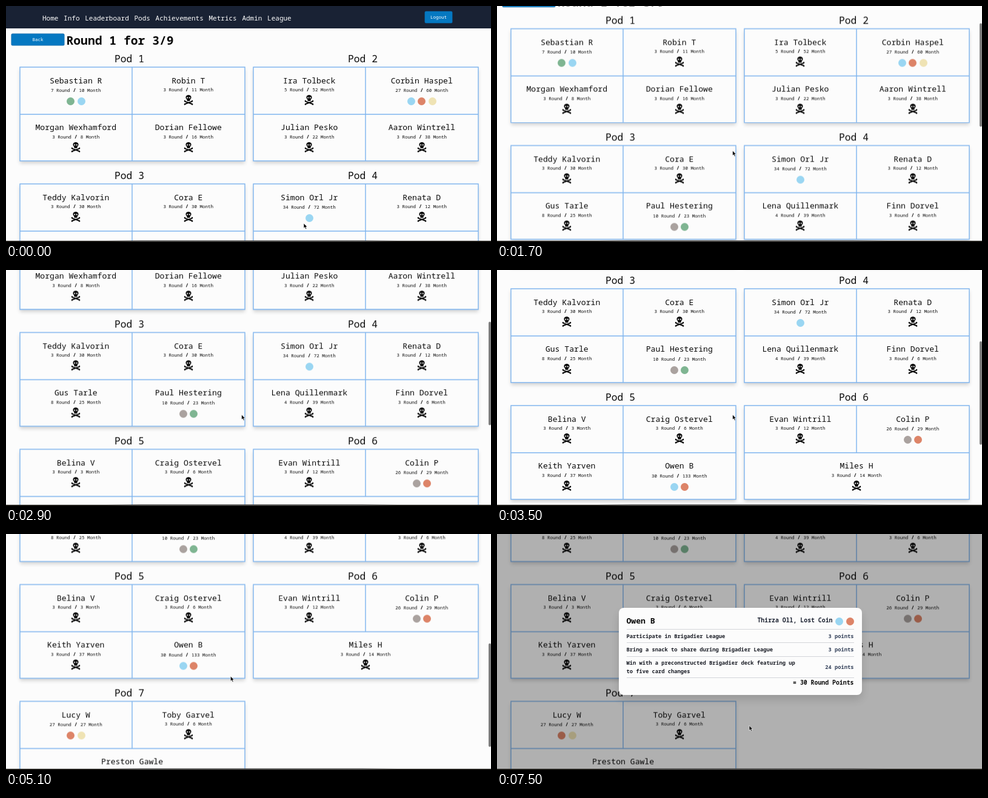
These frames come from a looping animation (800 by 390 pixels, 8000 ms). An HTML page:

```html
<!DOCTYPE html>
<html lang="en">
<head>
<meta charset="utf-8">
<title>League pods</title>
<style>
html, body { margin: 0; width: 100%; height: 100%; overflow: hidden; background: #fcfcfc; }
body { font-family: "Roboto Mono", "Noto Sans Mono", "DejaVu Sans Mono", monospace; color: #0a0a0a; }
#stage { position: relative; width: 800px; height: 390px; overflow: hidden; }
#stage div, #stage svg { position: absolute; }
#page { left: 0; top: 0; width: 800px; height: 880px; will-change: transform; }
.nav { left: 0; top: 0; width: 800px; height: 37px; background: #192234; }
.btn { background: #0578c1; border-radius: 2px; box-shadow: 0 0 0 .5px #0a5f9c; }
.text { white-space: pre; line-height: 1; }
.box { width: 371px; height: 155px; box-shadow: 0 0 0 .7px #7db4ee, 0 4px 6px rgba(0, 0, 0, .17); }
.cell { height: 77.5px; box-shadow: inset 0 0 0 .7px #7db4ee; }
.slash { font-size: 8.3px; font-weight: 700; }
.mana { width: 13px; height: 13px; border-radius: 50%; }
#dim { inset: 0; background: #000; }
#modal { left: 200.5px; top: 122px; width: 400.5px; height: 144px; border-radius: 8px;
  background: #fcfcfc; box-shadow: 0 8px 16px rgba(0, 0, 0, .14); }
.rule { left: 12.5px; width: 375px; height: 1px; background: #d3d5d9; }
#bar { left: 796px; top: 0; width: 3.5px; height: 171px; border-radius: 2px; background: #7d7d7d; }
#dock { left: 0; top: 388px; width: 800px; height: 2px; background: #211f1b; }
#glow { left: 165px; top: 386.5px; width: 480px; height: 3.5px;
  background: linear-gradient(90deg, #5550, #5559 12%, #5559 88%, #5550); }
</style>
</head>
<body>
<div id="stage">
  <div id="page"></div>
  <div id="dim"></div>
  <div id="modal"></div>
  <div id="bar"></div>
  <div id="dock"></div>
  <div id="glow"></div>
  <svg id="arrow" width="10" height="13" viewBox="-1 -1 10 13">
    <path d="M0 0V8.3L1.9 6.6L3.3 9.7L4.8 9L3.5 6.1H6Z" fill="#000" stroke="#fff" stroke-width=".7"/>
  </svg>
  <svg id="beam" width="8" height="12" viewBox="-4 -6 8 12">
    <path d="M-2 -4.5Q0 -4.5 0 -3V3Q0 4.5 -2 4.5M2 -4.5Q0 -4.5 0 -3M0 3Q0 4.5 2 4.5" fill="none" stroke="#111"/>
  </svg>
</div>
<script>
const $ = id => document.getElementById(id);
const page = $("page"), modal = $("modal");

const MANA = { u: "#9ad6f2", g: "#7fb592", r: "#dd8468", w: "#efe3b4", b: "#aaa29f" };

// Each player: name, round points, month points, colours.
const PODS = [
  [["Sebastian R", 7, 10, "gu"], ["Robin T", 3, 11], ["Morgan Wexhamford", 3, 8], ["Dorian Fellowe", 3, 16]],
  [["Ira Tolbeck", 5, 52], ["Corbin Haspel", 27, 60, "urw"], ["Julian Pesko", 3, 22], ["Aaron Wintrell", 3, 38]],
  [["Teddy Kalvorin", 3, 30], ["Cora E", 3, 30], ["Gus Tarle", 8, 25], ["Paul Hestering", 10, 23, "bg"]],
  [["Simon Orl Jr", 34, 72, "u"], ["Renata D", 3, 12], ["Lena Quillenmark", 4, 39], ["Finn Dorvel", 3, 6]],
  [["Belina V", 3, 3], ["Craig Ostervel", 3, 6], ["Keith Yarven", 3, 37], ["Owen B", 30, 133, "ur"]],
  [["Evan Wintrill", 3, 12], ["Colin P", 26, 29, "br"], ["Miles H", 3, 14]],
  [["Lucy W", 27, 27, "rw"], ["Toby Garvel", 3, 6], ["Preston Gawle", 3, 27]]
];

const SKULL = `<g stroke="#0a0a0a" stroke-width="2" stroke-linecap="round">
  <path d="M2 10.6L14 15M14 10.6L2 15"/></g>
  <g fill="#0a0a0a"><circle cx="1.9" cy="9.9" r="1.2"/><circle cx="14.1" cy="9.9" r="1.2"/>
  <circle cx="1.9" cy="15.6" r="1.2"/><circle cx="14.1" cy="15.6" r="1.2"/>
  <ellipse cx="8" cy="4.1" rx="4.6" ry="4.1"/><rect x="5.4" y="5" width="5.2" height="4.9" rx=".9"/></g>
  <g fill="#fcfcfc"><circle cx="6.2" cy="4.6" r="1.15"/><circle cx="9.8" cy="4.6" r="1.15"/></g>`;

function add(parent, cls, style, html = "") {
  const el = document.createElement("div");
  el.className = cls;
  Object.assign(el.style, style);
  el.innerHTML = html;
  parent.append(el);
  return el;
}

// Text centred vertically on y; align is 0 (left), .5 (centre) or 1 (right) of x.
function text(parent, html, x, y, size, { align = 0, weight = 500, color = "" } = {}) {
  return add(parent, "text", {
    left: x + "px", top: y + "px", fontSize: size + "px", fontWeight: weight, color,
    transform: `translate(${-align * 100}%, -50%)`
  }, html);
}

function rect(parent, cls, x, y, w, h) {
  return add(parent, cls, { left: x + "px", top: y + "px", width: w + "px", height: h + "px" });
}

function mana(parent, key, x, y) {
  add(parent, "mana", { left: x - 6.5 + "px", top: y - 6.5 + "px", background: MANA[key] });
}

function player(box, [name, round, month, colors = ""], x, y, width) {
  const cell = rect(box, "cell", x, y, width, 77.5);
  const mid = width / 2, center = { align: .5 };
  text(cell, name, mid, 22.7, 13.1, center);
  text(cell, `${round} Round<span class="slash"> / </span>${month} Month`,
    mid, colors ? 38.2 : 37.3, 7.5, { align: .5, weight: 400 });
  [...colors].forEach((key, i) => mana(cell, key, mid + (i - (colors.length - 1) / 2) * 17.5, 56.5));
  if (!colors) {
    cell.insertAdjacentHTML("beforeend",
      `<svg style="left:${mid - 8}px;top:46px" width="16" height="17" viewBox="0 0 16 17">${SKULL}</svg>`);
  }
}

function buildPage() {
  const nav = rect(page, "nav", 0, 0, 800, 37);
  let x = 60;
  for (const item of "Home Info Leaderboard Pods Achievements Metrics Admin League".split(" ")) {
    text(nav, item, x, 18.8, 11, { color: "#fff" });
    x += item.length * 6.6 + 8.7;
  }
  const label = { align: .5, color: "#fff" };
  text(rect(nav, "btn", 691, 9, 45, 19), "Logout", 22.5, 9.7, 7.5, label);
  text(rect(page, "btn", 9, 46, 87, 19), "Back", 43.5, 9.7, 7.5, label);
  text(page, "Round 1 for 3/9", 99.5, 57, 19.7, { weight: 700 });

  PODS.forEach((pod, i) => {
    const left = 22.5 + (i % 2) * 385, top = 101 + (i >> 1) * 193;
    text(page, "Pod " + (i + 1), left + 181, top - 14.3, 16.3, { align: .5, weight: 400 });
    const box = rect(page, "box", left, top, 371, 155);
    pod.forEach((p, n) => {
      const wide = n === 2 && pod.length === 3;
      player(box, p, (n % 2) * 185.5, (n >> 1) * 77.5, wide ? 371 : 185.5);
    });
  });
}

function buildModal() {
  const right = 387.5;
  text(modal, "Owen B", 12.5, 22.3, 13.1, { weight: 700 });
  text(modal, "Thirza Oll, Lost Coin", 352.5, 21.3, 9.85, { align: 1, weight: 600, color: "#1e2433" });
  mana(modal, "u", 363.5, 22);
  mana(modal, "r", 381, 22);
  const ink = { weight: 600, color: "#1a1d26" };
  const points = { align: 1, weight: 600, color: "#334059" };
  [
    ["Participate in Brigadier League", 46.7],
    ["Bring a snack to share during Brigadier League", 69],
    ["Win with a preconstructed Brigadier deck featuring up", 91.3],
    ["to five card changes", 104.6]
  ].forEach(([line, y]) => text(modal, line, 12.5, y, 8.75, ink));
  [[3, 46.7], [3, 69], [24, 98]].forEach(([n, y]) => text(modal, n + " points", right, y, 8.75, points));
  text(modal, "= 30 Round Points", right, 123.8, 9.85, { align: 1, weight: 700 });
  for (const y of [35, 57, 80, 115]) add(modal, "rule", { top: y + "px" });
}

const SCROLL = [[900, 0], [1300, 29], [2200, 106.5], [3500, 263], [4500, 359], [5000, 403.5]];
const MOUSE_X = [[200, 491], [600, 388.5], [5000, 388.5], [5500, 297.5], [7200, 297.5], [7500, 416]];
const MOUSE_Y = [[200, 359], [600, 239], [5000, 239], [5500, 218.5], [7200, 218.5], [7500, 316.5]];
const FADE = [[5800, 0], [5900, .45], [6000, .8], [6100, .94], [6200, 1]];

function track(keys, t) {
  if (t <= keys[0][0]) return keys[0][1];
  for (let i = 1; i < keys.length; i++) {
    const [t0, v0] = keys[i - 1], [t1, v1] = keys[i];
    if (t <= t1) return v0 + (v1 - v0) * (t - t0) / (t1 - t0);
  }
  return keys[keys.length - 1][1];
}

function draw() {
  const t = Math.floor(performance.now() % 8000 / 100) * 100;
  const scroll = track(SCROLL, t), fade = track(FADE, t);
  const x = track(MOUSE_X, t), y = track(MOUSE_Y, t);
  const overText = t >= 5900 && t <= 7200;

  page.style.transform = `translateY(${-scroll}px)`;
  $("dim").style.opacity = .3 * fade;
  modal.style.opacity = fade;
  modal.style.transform = `scale(${.95 + .05 * fade})`;
  $("bar").style.opacity = t > 900 && t < 5500 ? 1 : 0;
  $("bar").style.transform = `translateY(${scroll * .448}px)`;
  $("arrow").style.transform = `translate(${x - 1}px, ${y - 1}px)`;
  $("beam").style.transform = `translate(${x - 3.5}px, ${y - 5.5}px)`;
  $("arrow").style.opacity = overText ? 0 : 1;
  $("beam").style.opacity = overText ? 1 : 0;
  requestAnimationFrame(draw);
}

buildPage();
buildModal();
draw();
</script>
</body>
</html>
```
